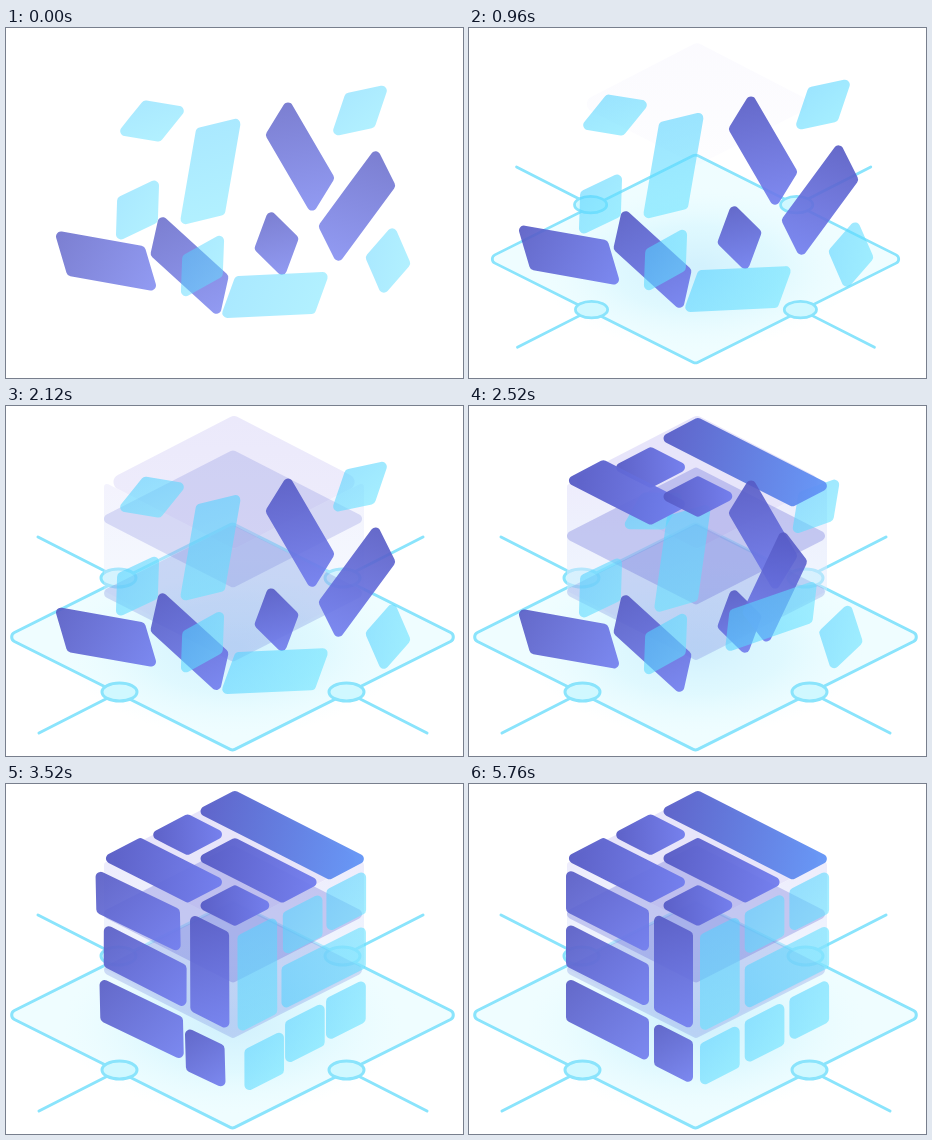
An HTML page with a canvas for the animation above (5.92 s loop, 457 by 350 pixels).

```html
<!DOCTYPE html>
<html lang="en">
<head>
<meta charset="utf-8">
<title>Cube assembly</title>
<style>
  html, body { margin: 0; width: 100%; height: 100%; overflow: hidden; background: #fff; }
  canvas { display: block; width: 457px; height: 350px; }
</style>
</head>
<body>
<canvas id="stage"></canvas>
<script>
const W = 457, H = 350, LOOP = 5920, STEP = 40, LAST = 5760;
const canvas = document.getElementById('stage');
const ctx = canvas.getContext('2d');
const ratio = window.devicePixelRatio || 1;
canvas.width = W * ratio;
canvas.height = H * ratio;

const SLOPE = 0.508, RADIUS = 5;
const DARK = ['84,88,194', '114,126,240'];
const LIGHT = ['84,210,255', '100,226,255'];
const SKY = ['88,92,198', '98,150,248'];

// Each side tile floats as a parallelogram (corner and two edges),
// then springs at `start` into its cell: column, row, columns, rows.
const dark = (start, cell, pose) => ({ start, cell, pose, left: true });
const light = (start, cell, pose) => ({ start, cell, pose, left: false });
const rear = [
  light(2365, [1, 0, 1, 1], [138, 73, 40, 8, -24, 32]),
  light(2390, [0, 0, 1, 2], [191, 101, 42, -9, -15, 94]),
  light(2270, [2, 0, 1, 1], [340, 66, 40, -7, -12, 40]),
  light(2656, [0, 2, 1, 1], [112, 170, 39, -17, 0, 41]),
  light(2370, [2, 2, 1, 1], [360, 229, 27, -29, 17, 36])
];
const front = [
  dark(3070, [0, 2, 2, 1], [51, 205, 87, 14, 11, 42]),
  dark(3020, [0, 1, 2, 1], [155, 189, 67, 59, -10, 38]),
  dark(2800, [2, 2, 1, 1], [264, 184, 28, 26, -15, 37]),
  dark(2560, [0, 0, 2, 1], [282, 74, 46, 76, -22, 33]),
  dark(2345, [2, 0, 1, 2], [370, 123, 19, 35, -57, 75]),
  light(2525, [1, 2, 1, 1], [177, 228, 39, -20, 0, 40]),
  light(2205, [1, 1, 2, 1], [230, 249, 91, -3, -13, 39])
];

// Lid tiles: cell and span on the top face.
const lids = [
  { start: 2320, cell: [2, 0], span: 3, ink: SKY },
  { start: 2245, cell: [1, 0], span: 1, ink: DARK },
  { start: 2345, cell: [0, 0], span: 2, ink: DARK },
  { start: 2540, cell: [1, 1], span: 2, ink: DARK },
  { start: 2430, cell: [0, 2], span: 1, ink: DARK }
];

const clamp = v => Math.max(0, Math.min(1, v));
const ramp = (t, from, to) => clamp((t - from) / (to - from));
const mix = (a, b, u) => a + (b - a) * u;

// Underdamped spring from 0 to 1, first overshoot at 720 ms.
function spring(ms) {
  const s = Math.max(0, ms) / 720, a = Math.PI * s;
  return 1 - Math.exp(-2.53 * s) * (Math.cos(a) + 0.805 * Math.sin(a));
}

const bounce = ms => -80 * Math.exp(-ms / 156) * Math.cos(ms / 111);
const bob = t => -3.5 * (1 - Math.cos(2 * Math.PI * t / 2560));
const platformScale = t => 1 - 0.48 * Math.pow(1 - ramp(t, 600, 1400), 3);

function quad([x, y, ux, uy, vx, vy]) {
  return [[x, y], [x + ux, y + uy], [x + ux + vx, y + uy + vy], [x + vx, y + vy]];
}

function diamond(cx, cy, rx, ry) {
  return [[cx - rx, cy], [cx, cy - ry], [cx + rx, cy], [cx, cy + ry]];
}

// Push corners out by the length that rounding takes off.
function sharpen(points) {
  const unit = (a, b) => {
    const d = Math.hypot(b[0] - a[0], b[1] - a[1]);
    return [(b[0] - a[0]) / d, (b[1] - a[1]) / d];
  };
  return points.map((p, i) => {
    const a = unit(p, points[(i + 1) % 4]), b = unit(p, points[(i + 3) % 4]);
    const sum = [a[0] + b[0], a[1] + b[1]], size = Math.hypot(...sum);
    const half = Math.acos(size / 2);
    const push = RADIUS * (1 / Math.sin(half) - 1) / size;
    return [p[0] - sum[0] * push, p[1] - sum[1] * push];
  });
}

function sideCell({ left, cell: [col, row, cols, rows] }) {
  const dir = left ? 1 : -1, pitch = left ? 44 : 44.7;
  const x = (left ? 97 : 231) + col * pitch;
  const y = (left ? 84 : 151) + dir * col * pitch * SLOPE + row * 54.4;
  const w = cols * pitch - 5, h = rows * 54.4 - 10.8;
  return quad([x, y, w, dir * w * SLOPE, 0, h]);
}

function lidCell({ cell: [up, down], span }, lift) {
  const x = 94 + 47.3 * (up + down), y = 74.5 + 23.6 * (down - up) + lift;
  const w = 47.3 * span - 7;
  return quad([x, y, 40.3, -21, w, w * SLOPE]);
}

function trace(points, radius) {
  const n = points.length, [a, b] = [points[n - 1], points[0]];
  ctx.beginPath();
  ctx.moveTo((a[0] + b[0]) / 2, (a[1] + b[1]) / 2);
  points.forEach((p, i) => {
    const next = points[(i + 1) % n];
    ctx.arcTo(p[0], p[1], next[0], next[1], radius);
  });
  ctx.closePath();
}

function fillShape(points, radius, style) {
  trace(points, radius);
  ctx.fillStyle = style;
  ctx.fill();
}

function fillTile(points, ink, alpha) {
  const g = ctx.createLinearGradient(...points[0], ...points[2]);
  g.addColorStop(0, `rgba(${ink[0]},${alpha})`);
  g.addColorStop(1, `rgba(${ink[1]},${alpha})`);
  fillShape(points, RADIUS, g);
}

function drawPlatform(t) {
  const scale = platformScale(t), floor = diamond(0, 0, 227, 113.5);
  ctx.save();
  ctx.globalAlpha = ramp(t, 600, 920);
  ctx.translate(226.5, 231);
  ctx.scale(scale, scale);
  fillShape(floor, RADIUS, '#effdff');

  ctx.save();
  ctx.scale(1, 0.52);
  const glow = ctx.createRadialGradient(0, 20, 10, 0, 20, 170);
  glow.addColorStop(0, 'rgba(160,220,250,.36)');
  glow.addColorStop(0.5, 'rgba(180,236,253,.26)');
  glow.addColorStop(1, 'rgba(220,250,255,0)');
  ctx.fillStyle = glow;
  ctx.fillRect(-180, -160, 360, 360);
  ctx.restore();

  trace(floor, RADIUS);
  ctx.strokeStyle = '#8ae4fc';
  ctx.lineWidth = 3;
  ctx.lineCap = 'round';
  ctx.stroke();

  for (const [x, y] of [[-114, -59], [110, -59], [-113, 55], [114, 55]]) {
    ctx.beginPath();
    ctx.moveTo(x, y);
    ctx.lineTo(x + Math.sign(x) * 80.5, y + Math.sign(y) * 41);
    ctx.stroke();
    ctx.beginPath();
    ctx.ellipse(x, y, 17.5, 9, 0, 0, 7);
    ctx.fillStyle = '#d0f8ff';
    ctx.fill();
    ctx.stroke();
  }
  ctx.restore();
}

function drawBody(t) {
  const scale = platformScale(t), rise = ramp(t, 1650, 2350);
  const soft = ctx.createLinearGradient(0, 8, 0, 145);
  soft.addColorStop(0, 'rgba(226,223,249,.9)');
  soft.addColorStop(1, `rgba(226,223,249,${mix(0.35, 0.9, rise)})`);
  ctx.save();
  ctx.globalAlpha = mix(0.5 * ramp(t, 640, 1600), 0.9, rise);
  fillShape(diamond(228, 76, 130 * scale, 67 * scale), 8, soft);
  ctx.restore();

  // Side walls fade towards the floor.
  const wall = ctx.createLinearGradient(0, 76, 0, 250);
  wall.addColorStop(0, `rgba(232,230,251,${0.75 * rise})`);
  wall.addColorStop(1, `rgba(215,235,253,${0.25 * rise})`);
  fillShape([[98, 76], [228, 143], [358, 76], [358, 185], [228, 253], [98, 185]], 3, wall);

  const low = 0.28 * ramp(t, 1240, 1700);
  fillShape(diamond(227, mix(190, 186, rise), 135, 68.5), RADIUS, `rgba(112,128,220,${low})`);
  fillShape(diamond(227, mix(78, 130, rise), 135, 69), RADIUS, `rgba(104,110,214,${0.32 * rise})`);
}

function drawPiece(piece, t) {
  const p = spring(t - piece.start);
  const from = sharpen(quad(piece.pose)), to = sideCell(piece);
  const lift = bob(t) * (1 - p);
  const points = from.map(([x, y], i) => [mix(x, to[i][0], p), mix(y, to[i][1], p) + lift]);
  const fade = mix(0.86, 1, ramp(t, 0, 600));
  fillTile(points, piece.left ? DARK : LIGHT, (piece.left ? 0.9 : 0.58) * fade);
}

function drawLids(t) {
  for (const lid of lids) {
    const age = t - lid.start;
    if (age > 0) fillTile(lidCell(lid, bounce(age)), lid.ink, 0.95 * ramp(age, 0, 80));
  }
}

function draw(t) {
  ctx.setTransform(ratio, 0, 0, ratio, 0, 0);
  ctx.fillStyle = '#fff';
  ctx.fillRect(0, 0, W, H);
  if (t > 600) {
    drawPlatform(t);
    drawBody(t);
  }
  rear.forEach(piece => drawPiece(piece, t));
  drawLids(t);
  front.forEach(piece => drawPiece(piece, t));
}

const origin = performance.now();
function tick() {
  const t = (performance.now() - origin) % LOOP;
  draw(Math.min(LAST, Math.floor(t / STEP) * STEP));
  requestAnimationFrame(tick);
}
tick();
</script>
</body>
</html>
```
